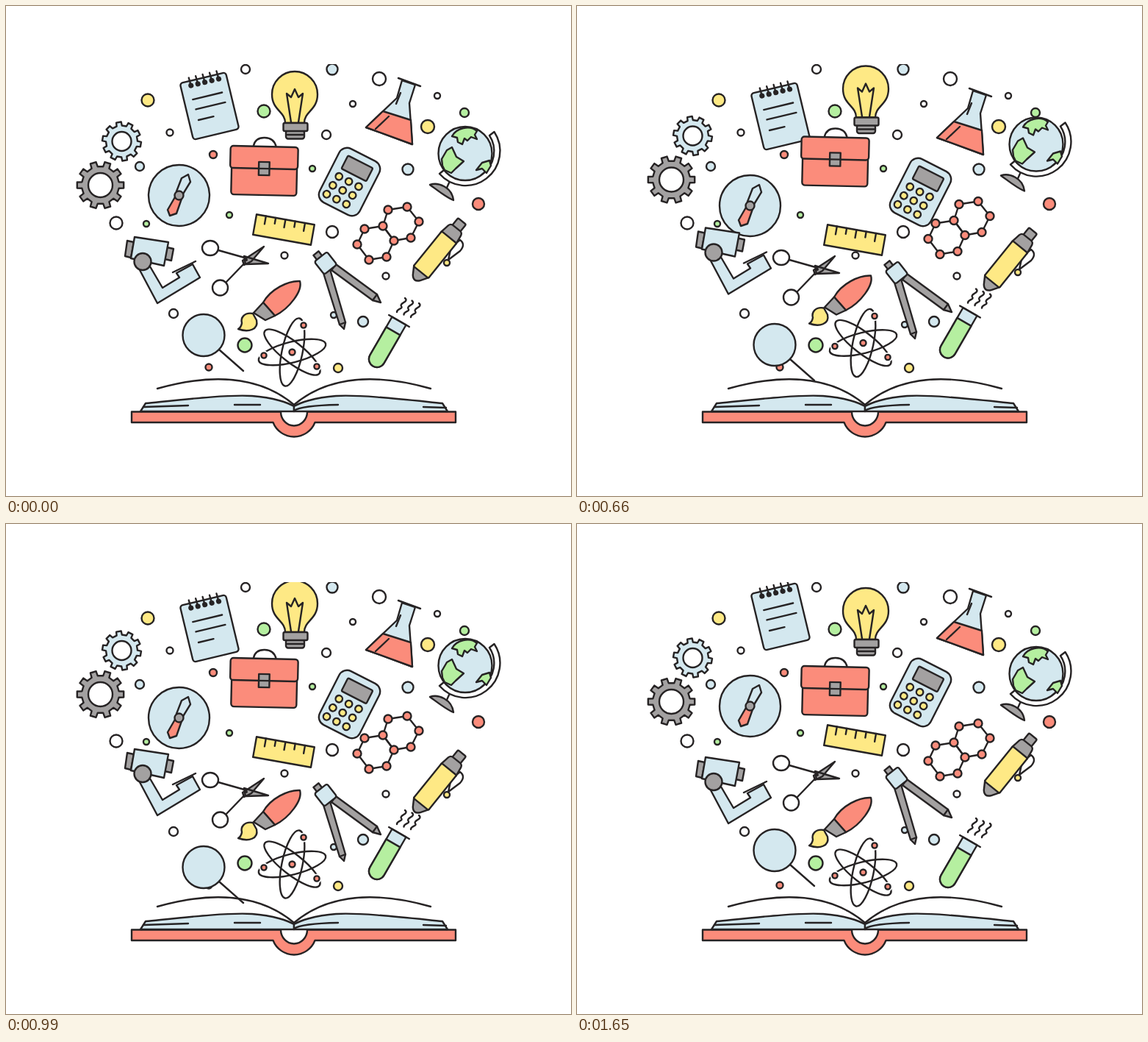
Animation, 769 px wide and 666 px high, one loop 1980 ms. Source, as an HTML page:

```html
<!DOCTYPE html>
<html lang="en">
<head>
<meta charset="utf-8">
<title>Open book of science</title>
<style>
html, body { margin: 0; width: 100%; height: 100%; overflow: hidden; background: #fff; }
svg { display: block; width: 769px; height: 666px; clip-path: inset(79px 0 79px 0);
  fill: none; stroke: #262324; stroke-width: 2.4; stroke-linejoin: round; stroke-linecap: round; }
.b { fill: #d4e8ef; }
.r { fill: #fb8c7b; }
.y { fill: #fee985; }
.g { fill: #b5efa0; }
.k { fill: #a3a1a1; }
.w { fill: #fff; }
.ink { fill: #262324; stroke: none; }
.halo { fill: #fff; stroke: none; }
</style>
</head>
<body>
<svg viewBox="0 0 769 666">
  <g id="dots"></g>

  <g id="book">
    <path class="r" d="M171 551.500H612V566H420.500A30.600 30.600 0 0 1 363.500 566H171Z"/>
    <path class="w" d="M374 551.500A18 19 0 0 0 410 551.500"/>
    <g id="page">
      <path class="b" d="M183 551L190 540C240 535 300 528 335 530C365 532 385 540 392 544V551Z"/>
      <path d="M206 520C270 502 340 498 392 542"/>
    </g>
    <use href="#page" transform="matrix(-1 0 0 1 784 0)"/>
    <path d="M187 545L248 543M311 542H346M392 550Q402 543 452 542M568 545L599 546"/>
  </g>

  <g class="bob">
    <g id="gears"></g>
    <!-- bulb -->
    <path class="y" d="M380 159C380 143 362 142 362 120A31 31 0 0 1 424 120C424 142 406 143 406 159Z"/>
    <path d="M388 158L382 119L388 124L393 113L398 124L404 119L398 158"/>
    <rect class="k" x="381" y="169" width="25" height="11.500" rx="3"/>
    <rect class="k" x="377.500" y="159" width="33" height="11" rx="2"/>
    <path d="M383 175H405"/>
    <g id="molecule"></g>
    <!-- brush -->
    <path class="r" d="M350 403C360 385 384 373 400 374C404 387 386 411 366 421Z"/>
    <path class="k" d="M350 403L366 421L353 427L337 417Z"/>
    <path class="y" d="M336 418C324 416 319 424 321 431Q320 437 316 439C330 444 344 440 341 427Z"/>
  </g>

  <g class="sink">
    <!-- notepad -->
    <g transform="translate(277 136) rotate(-13.500)">
      <rect class="b" x="-32" y="-39.500" width="64" height="79" rx="4"/>
      <path d="M-20 -14H21M-19 0H22M-19 15H2"/>
      <g id="rings"></g>
    </g>
    <!-- flask -->
    <path class="b" d="M539 101L532 125L490 165L553 188L549 132L557 107Z"/>
    <path class="r" d="M513 143L551 155L553 188L490 165Z"/>
    <path d="M534 98L564 109M537 118L531 133M521 150L503 167"/>
    <!-- calculator -->
    <g transform="translate(467.500 239) rotate(27)">
      <rect class="b" x="-30.500" y="-41" width="61" height="82" rx="12"/>
      <rect class="k" x="-18" y="-31" width="38" height="20" rx="2"/>
      <g id="keys"></g>
    </g>
    <!-- compass -->
    <circle class="b" cx="235.500" cy="257.500" r="41.500"/>
    <path class="b" d="M232 252L239 234L248 229L251 239L240 257Z"/>
    <path class="r" d="M231 258L220 277L223 285L232 282L239 262Z"/>
    <circle class="k" cx="235.500" cy="257.500" r="6"/>
    <!-- ruler -->
    <g transform="translate(378 304) rotate(10)">
      <rect class="y" x="-40" y="-14" width="80" height="28"/>
      <path d="M-27 -14v11M-13.500 -14v8M0 -14v11M13.500 -14v8M27 -14v11"/>
    </g>
  </g>

  <g class="lift">
    <!-- globe -->
    <path class="k" d="M577 243C588 239 607 246 609 264C599 260 588 251 577 243Z"/>
    <path d="M604 238L600 247"/>
    <path class="w" d="M664.500 171A47 47 0 0 1 590 228L596 223A39 39 0 0 0 658 176Z"/>
    <circle class="b" cx="625" cy="200.500" r="36.500"/>
    <path class="g" d="M607 177C613 166 631 161 641 170L638 175L641 181L633 178L628 183L624 180L621 188L615 185L614 179Z"/>
    <path class="g" d="M594 217L593 208L600 196L607 192L613 205L623 211L612 221L606 227L597 223Z"/>
    <path class="g" d="M640 223L648 213L658 210L660 217L654 227L648 221Z"/>
    <!-- briefcase -->
    <g transform="rotate(1.300 351 223)">
      <path class="w" d="M336 191Q338 179 351 179Q364 179 367 191"/>
      <rect class="r" x="307" y="205" width="89" height="52" rx="4"/>
      <rect class="r" x="305" y="191" width="92" height="30" rx="4"/>
      <rect class="k" x="344" y="212" width="14.500" height="18"/>
      <path d="M344 221H358"/>
    </g>
    <!-- microscope -->
    <path class="b" d="M181 357L206 404L264 369L254 351L232 363L236 369L213 383L196 354Z"/>
    <path d="M227 362L258 347"/>
    <path class="k" d="M165 319L174 321L170 342L162 340ZM219 328L228 330L225 346L216 344Z"/>
    <path class="b" d="M175 314L221 321L215 353L170 343Z"/>
    <circle class="k" cx="186" cy="347.500" r="11.500"/>
    <g id="atom"></g>
    <!-- test tube -->
    <g transform="translate(535 428) rotate(30)">
      <path class="b" d="M-11 0V60A11 11 0 0 0 11 60V0Z"/>
      <path class="g" d="M-11 16V60A11 11 0 0 0 11 60V16Z"/>
      <path d="M-16 0H16"/>
    </g>
    <g id="steam"></g>
  </g>

  <g class="drop">
    <!-- pen -->
    <circle class="y" cx="600" cy="349" r="4"/>
    <path class="w" d="M618 318Q626 324 618 333L602 345L606 327Z"/>
    <g transform="translate(588 333) rotate(39)">
      <rect class="k" x="-7" y="-52" width="14" height="14" rx="2"/>
      <path class="k" d="M-13 36L-6 47Q0 54 6 47L13 36Z"/>
      <path class="k" d="M-13 -23L-11 -36Q-10 -40 -6 -40H6Q10 -40 11 -36L13 -23Z"/>
      <rect class="y" x="-13" y="-24" width="26" height="61" rx="2"/>
    </g>
    <!-- scissors -->
    <path d="M289 332L328 343M299 376L328 346"/>
    <ellipse class="w" cx="278" cy="329" rx="11" ry="10"/>
    <circle class="w" cx="291.500" cy="383" r="10.500"/>
    <path class="k" d="M324 340L357 350L326 351ZM322 346L351 327L334 347L324 352Z"/>
    <circle class="ink" cx="327" cy="345" r="2"/>
    <!-- dividers -->
    <circle class="b" cx="446" cy="420" r="4"/>
    <path class="k" d="M443 359L449 351L505 392L510 403L499 400Z"/>
    <path class="k" d="M432 363L441 358L462 430L460 439L454 433Z"/>
    <path d="M499 400L505 392M454 433L462 430"/>
    <rect class="k" x="-4.500" y="-5" width="9" height="10" transform="translate(425 340) rotate(-38)"/>
    <rect class="b" x="-11" y="-11" width="22" height="22" rx="3" transform="translate(435 349.500) rotate(-38)"/>
    <!-- magnifier -->
    <circle class="b" cx="269" cy="447.500" r="28.500"/>
    <path d="M290 467L323 496"/>
  </g>
</svg>
<script>
const fill = (id, parts) => document.getElementById(id).innerHTML = parts.join('');
const range = n => [...Array(n).keys()];
const dot = (x, y, r, cls) => `<circle class="${cls}" cx="${x}" cy="${y}" r="${r}"/>`;
const line = d => `<path d="${d}"/>`;

fill('dots', `326,86,6,w 444,86,7.5,b 508,99,9,w 193,128,8.5,y 351,143,8.5,g 472,133,4,w
587,122,4,w 624,145,6,g 574,164,9,y 223,172,4.5,w 436,175,6,w 282,202,5,r 182,218,6,b
417,221,4,g 547,222,7.5,b 643,269,8,r 150,295,8.5,w 191,296,4,g 304,284,4,g 444,307,8,w
379,339,4.5,w 517,367,4.5,w 228,418,6,w 486,429,7,b 325,461,9.5,g 276,491,4.5,r 452,492,6,y`
  .split(/\s+/).map(s => dot(...s.split(','))));

function gear(x, y, outer, root, hole, phase, cls) {
  const teeth = 10, step = 2 * Math.PI / teeth;
  const at = (turn, r) => {
    const a = (turn + phase) * step;
    return `${(x + r * Math.sin(a)).toFixed(1)} ${(y - r * Math.cos(a)).toFixed(1)}`;
  };
  const points = range(teeth).flatMap(i => [
    at(i - .27, root), at(i - .2, outer), at(i + .2, outer), at(i + .27, root)]);
  return `<path class="${cls}" d="M${points.join('L')}Z"/>` + dot(x, y, hole, 'w');
}
fill('gears', [gear(157.5, 184, 26.5, 21.5, 13, -.25, 'b'), gear(128.5, 243.5, 32, 25.5, 16.5, .5, 'k')]);

const atoms = [[520, 277], [546, 273], [562, 293], [551, 315], [528, 319],
  [513, 299], [488, 303], [478, 324], [494, 345], [518, 341]];
fill('molecule', [
  line(`M${atoms.slice(0, 6).join('L')}Z`),
  line(`M${atoms.slice(4).join('L')}Z`),
  ...atoms.map(([x, y]) => dot(x, y, 5.5, 'r'))]);

fill('rings', range(5).map(i => {
  const x = -18 + i * 9.7;
  return line(`M${x} -33L${x - .5} -44`) + dot(x, -33, 3.6, 'ink');
}));

fill('keys', range(9).map(n => {
  const col = n % 3, row = (n - col) / 3;
  return dot(col * 15 - 16 - row * 2, row * 14.5, 4.7, 'y');
}));

const orbits = [102, 38, -14].map(a =>
  `<ellipse rx="47" ry="14" transform="translate(389.500 470.500) rotate(${a})"/>`);
const electrons = [[405, 434], [351, 475], [423, 490]].map(([x, y]) =>
  dot(x, y, 6.5, 'halo') + dot(x, y, 3.6, 'r'));
fill('atom', [...orbits, ...electrons, dot(389.5, 470.5, 4, 'r')]);

fill('steam', range(3).map(i =>
  line(`M${543 + i * 9.5} ${397 + i * 3.5}c6 5 -8 7 -5 11c3 4 -6 3 -6 8`)));

// Vertical offset of each group at every step of the loop
const moves = {
  bob: [0, -2, -7.5, -12, -7, -2],
  sink: [0, 6, 14, 6, 0, -10],
  lift: [0, -8, -12.5, -8, 0, 3],
  drop: [0, 8, 13, 19, 8, -4]
};
const groups = Object.entries(moves).map(([name, ys]) => [document.querySelector('.' + name), ys]);

const start = performance.now();
function draw(now) {
  const step = Math.floor(Math.max(0, now - start) / 330) % 6;
  for (const [el, ys] of groups) el.setAttribute('transform', `translate(0 ${ys[step]})`);
  requestAnimationFrame(draw);
}
draw(start);
</script>
</body>
</html>
```
